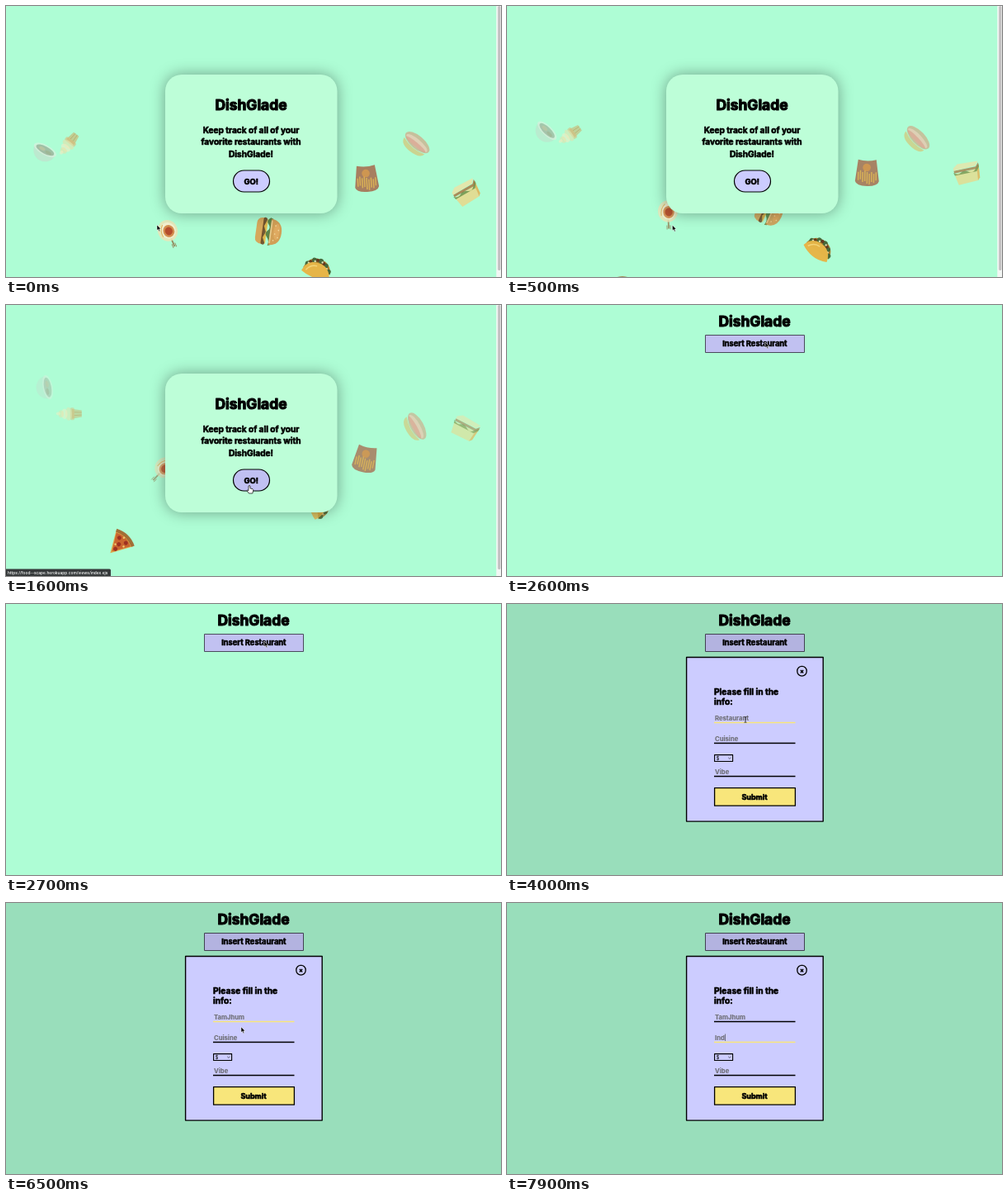
An HTML page with a canvas for the animation above (8000 ms loop, 600x328 px).

```html
<!DOCTYPE html>
<html lang="en">
<head>
<meta charset="utf-8">
<title>DishGlade</title>
<style>
html, body { margin: 0; width: 100%; height: 100%; overflow: hidden; background: #aefdd5; }
canvas { display: block; width: 600px; height: 328px; }
</style>
</head>
<body>
<canvas id="stage" width="600" height="328"></canvas>
<script>
const ctx = document.getElementById('stage').getContext('2d');
const LOOP = 8000, W = 600, H = 328;
const MINT = '#aefdd5', LILAC = '#ccccff', YELLOW = '#f8e67b', INK = '#000';
const BRAND = 'DishGlade', PLACE = 'TamJhum';

// ---------- drawing helpers ----------
function text(s, x, y, size, { align = 'center', color = INK, weight = 700, round = 0.6 } = {}) {
  ctx.font = `${weight} ${size}px Inter, "Open Sans", sans-serif`;
  ctx.textAlign = align;
  ctx.fillStyle = ctx.strokeStyle = color;
  ctx.fillText(s, x, y);
  if (round) {
    ctx.lineJoin = 'round';
    ctx.lineWidth = round;
    ctx.strokeText(s, x, y);
  }
}
function box(x, y, w, h, fill, line = 0, stroke = INK, r = 0) {
  ctx.beginPath();
  ctx.roundRect(x, y, w, h, r);
  if (fill) { ctx.fillStyle = fill; ctx.fill(); }
  if (line) { ctx.strokeStyle = stroke; ctx.lineWidth = line; ctx.stroke(); }
}
function oval(x, y, rx, ry, fill, rot = 0) {
  ctx.beginPath();
  ctx.ellipse(x, y, rx, ry, rot, 0, Math.PI * 2);
  ctx.fillStyle = fill;
  ctx.fill();
}
function shape(d, fill, stroke, line = 1) {
  const p = new Path2D(d);
  if (fill) { ctx.fillStyle = fill; ctx.fill(p); }
  if (stroke) { ctx.strokeStyle = stroke; ctx.lineWidth = line; ctx.stroke(p); }
}
function dots(points, r, fill) {
  for (const [x, y] of points) oval(x, y, r, r, fill);
}

// ---------- food, drawn around its own centre ----------
const art = {
  bowl() {
    shape('M-14-3A13 13 0 0 0 14-3Z', '#c5dccb');
    oval(0, -3, 15, 6, '#e3f0e2');
    oval(0, -3, 12, 4.4, '#7f9a80');
    oval(-4, -3, 4, 2, '#c9c9a0');
    oval(5, -2, 4, 1.8, '#9db08a');
  },
  cone() {
    shape('M-6 3L6 3L4 15L-4 15Z', '#cfa860');
    box(-7.5, 1, 15, 5, '#dcb877', 0, INK, 1.5);
    shape('M-2 6L-1.5 15M2 6L1.5 15', null, '#b58f4c', 0.8);
    oval(0, -1, 8, 4, '#eadfa6');
    oval(0, -6, 6.3, 3.8, '#f5ecc2');
    oval(0, -10, 4.3, 3.2, '#eadfa6');
    oval(0.5, -13.5, 2, 2.6, '#f5ecc2');
  },
  hotdog() {
    shape('M-16 3Q0 9 16 3Q15 11 0 11.5T-16 3Z', '#e2b45a');
    oval(0, -2.5, 18, 8, '#d9916f');
    oval(0, -1.5, 16, 4.6, '#f2dccb');
    oval(0, 0.5, 15, 2.6, '#d69583');
  },
  fries() {
    shape('M-11-16Q0-13 11-16L14.5 10Q13 16 0 16T-14.5 10Z', '#a5492f');
    for (let i = -4; i <= 4; i++) box(i * 2.7 - 0.7, -1 + (i % 2) * 2, 1.5, 14 - Math.abs(i), '#efc651');
    oval(-0.5, -6.5, 4.8, 4.8, '#e0a04a');
  },
  sandwich() {
    shape('M-15-2L13-2L16-6L14 9L11 12L-13 12Z', '#f0d27f');
    shape('M11 12L13-2L16-6L14 9Z', '#d9ad52');
    shape('M-16-4Q-11 1-7-2T2-1T11-2L16-7L16-4L12 1L-15 0Z', '#5c8a45');
    shape('M-15-6L12-5L16-9L16-6L12-2L-15-3Z', '#a8652f');
    shape('M-15-9L-9-13L16-11L12-6L-15-6Z', '#f3dfa0');
  },
  pasta() {
    shape('M4 0L21 0', null, '#927f52', 1.8);
    shape('M17-2L22-2M17 2L22 2', null, '#927f52', 0.9);
    oval(0, 0, 13, 12, '#e9e6b9');
    oval(0, -0.5, 10, 9, '#f3f0d2');
    oval(1, -1, 7.5, 6.8, '#cf8240');
    oval(1, -1, 5, 4.6, '#b2472a');
    shape('M-9 3Q-4 9 5 8', null, '#dcb25c', 1.2);
  },
  burger() {
    shape('M-16 6L16 6Q16 15 9 15L-9 15Q-16 15-16 6Z', '#d99f50');
    box(-16.5, 3, 33, 4.5, '#6b4826', 0, INK, 2);
    shape('M-16 2L16 2L8 6L1 3L-6 6Z', '#e8c04f');
    shape('M-17-1Q-13 5-9 1T-1 1T7 1T17-1L16-4L-16-4Z', '#54783a');
    shape('M-16-2Q-15-16 0-16T16-2Z', '#d4954a');
    oval(-1, -10, 10, 3.6, '#e0ab62');
    shape('M-14-3L14-3', null, '#ead49a', 1.6);
    dots([[-8, -8], [-3, -12], [2, -8], [6, -12], [10, -7]], 0.8, '#f4dfa4');
  },
  taco() {
    shape('M-17 2Q-14-13 0-13T17 2Z', '#a87a2c');
    dots([[-13, -4], [-6, -10], [2, -11], [9, -7], [14, -1]], 3, '#45683a');
    dots([[-10, -7], [-2, -11], [6, -9]], 2, '#63391f');
    dots([[-12, -5], [-5, -9], [4, -10], [11, -4]], 1.2, '#dde0b4');
    shape('M-18 6Q-15-8-1-8T17 6Q8 11-1 10.5T-18 6Z', '#e6b548');
    shape('M-13 4Q-9-4-1-4', null, '#f4d478', 1.6);
  },
  pizza() {
    shape('M-14-8Q0-15 14-8L0 17Z', '#e0a446');
    shape('M-12-6Q0-12 12-6L0 14Z', '#c9622e');
    shape('M-14-8Q0-15 14-8', null, '#a06a32', 4);
    dots([[-5, -4], [5, -5], [0, 2], [1, 9]], 2.5, '#9c2f20');
    dots([[-1, -8], [-3, 5], [6, 0]], 1.3, '#f0cc70');
  }
};

// name, x, y at start, x speed, y speed (px/s), start angle, spin (deg/s)
const foods = [
  ['bowl', 46, 177, 1, -48, 28, 32],
  ['cone', 76, 167, 0.5, -22, 218, 32],
  ['hotdog', 497, 167, -0.6, -12, 40, 13],
  ['fries', 437, 209, -1, -14, -4, 10],
  ['sandwich', 558, 226, -1, -48, -32, 36],
  ['pasta', 196, 272, -2, -47, 66, 42],
  ['burger', 318, 273, 0, -48, 98, 34],
  ['taco', 377, 319, 1, -48, 16, 42],
  ['pizza', 143, 365, -3, -48, -12, 35]
];

function drawFoods(sec) {
  for (const [name, x, y, vx, vy, angle, spin] of foods) {
    const cy = y + vy * sec;
    ctx.save();
    ctx.globalAlpha = Math.min(1, cy / 300);
    ctx.translate(x + vx * sec, cy);
    ctx.rotate((angle + spin * sec) * Math.PI / 180);
    art[name]();
    ctx.restore();
  }
}

// ---------- pointer ----------
const path = [
  [0, 183, 265], [300, 183, 265], [1000, 270, 266], [1450, 295, 219], [1950, 295, 219],
  [2500, 313, 45], [2850, 313, 45], [3400, 289, 140], [6250, 289, 140],
  [6500, 285, 150], [6800, 285, 163], [8000, 285, 163]
];
function pointerAt(t) {
  const i = path.findIndex(k => k[0] > t);
  const [t0, x0, y0] = path[i - 1], [t1, x1, y1] = path[i];
  const k = (t - t0) / (t1 - t0), e = k * k * (3 - 2 * k);
  return [x0 + (x1 - x0) * e, y0 + (y1 - y0) * e];
}
const inside = ([x, y], l, t, r, b) => x > l && x < r && y > t && y < b;

function drawPointer([x, y], kind) {
  ctx.save();
  ctx.translate(x, y);
  ctx.lineJoin = 'round';
  if (kind === 'arrow') {
    shape('M0 0L0 6.6L1.5 5.3L2.7 7.8L3.8 7.2L2.7 4.9L4.7 4.7Z', INK, '#fff', 0.5);
  } else if (kind === 'hand') {
    shape('M-1 0Q0-1 1 0L1 3L4 3.6Q5 4 4.6 6L3.8 9L-.6 9L-3 5.6Q-2.6 4.4-1 5.6Z', '#fff', INK, 0.7);
  } else {
    shape('M-1.4-3.5Q0-3.5 0-2.5Q0-3.5 1.4-3.5M0-2.5L0 2.5M-1.4 3.5Q0 3.5 0 2.5Q0 3.5 1.4 3.5', null, '#222', 0.8);
  }
  ctx.restore();
}

// ---------- screens ----------
function landing(t, mouse) {
  const hover = inside(mouse, 275, 199, 320, 225);
  drawFoods(t / 1000);

  ctx.save();
  ctx.shadowColor = 'rgba(0,0,0,.36)';
  ctx.shadowBlur = 18;
  box(193, 83, 208.5, 168, '#bdfed8', 0, INK, 20);
  ctx.restore();

  text(BRAND, 297, 126, 17.4, { round: 1.1 });
  text('Keep track of all of your', 297, 153.7, 10.1);
  text('favorite restaurants with', 297, 168.2, 10.1);
  text(BRAND + '!', 297, 182.8, 10.1);
  box(275.5, 199, 44, 26, hover ? '#c0c0f2' : LILAC, 1.2, INK, 13);
  text('GO!', 297.3, 215.5, 9.4);

  box(594.3, 0, 5.7, H, '#f3f6f4');
  box(596.2, 0, 3.2, 320, '#c2c0c1', 0, INK, 1.6);

  if (hover) {
    box(0, 319.5, 127, 8.5, '#35393a', 0, INK, [0, 1.5, 0, 0]);
    text('https://food--scape.herokuapp.com/views/index.ejs', 2, 325.7, 4.85,
      { align: 'left', color: '#fff', weight: 500, round: 0 });
  }
  drawPointer(mouse, hover ? 'hand' : 'arrow');
}

function listPage(hover) {
  text(BRAND, 300, 26, 17.4, { round: 1.1 });
  box(240.5, 36.5, 120, 21, hover ? '#c1c1f1' : LILAC, 1, '#4a4a5c');
  text('Insert Restaurant', 300.3, 50.4, 9.3);
}

function field(hint, value, base, focused, sinceKey) {
  const left = { align: 'left', color: '#707078', weight: 700, round: 0.15 };
  text(value || hint, 252, base, 7.7, left);
  ctx.fillStyle = focused ? YELLOW : INK;
  ctx.fillRect(251, base + 2.2, 98.5, 1.5);
  if (focused && Math.floor(sinceKey / 500) % 2 === 0) {
    const x = 252.3 + (value ? ctx.measureText(value).width : 0);
    ctx.fillStyle = '#333';
    ctx.fillRect(x, base - 7, 0.6, 8.5);
  }
}

// returns the typed part of a word and the time since the last key or focus
function typed(word, keys, start, t) {
  const n = keys.filter(k => k <= t).length;
  return [word.slice(0, n), t - (n ? keys[n - 1] : start)];
}
const FOCUS1 = 3450, FOCUS2 = 6900;
const keys1 = [...PLACE].map((_, i) => 4700 + i * 200);
const keys2 = [7450, 7650, 7800];

function modal(t) {
  ctx.fillStyle = 'rgba(0,0,0,.12)';
  ctx.fillRect(0, 0, W, H);
  box(217.6, 64.5, 165.6, 198.6, LILAC, 1.4);

  box(351.8, 75.3, 11.4, 11.8, null, 1.3, INK, 5.6);
  shape('M355.9 80L359.1 83.4M359.1 80L355.9 83.4', null, INK, 1.5);

  text('Please fill in the', 251, 110, 10.2, { align: 'left' });
  text('info:', 251, 122, 10.2, { align: 'left' });

  const [name, since1] = typed(PLACE, keys1, FOCUS1, t);
  const [cuisine, since2] = typed('Ind', keys2, FOCUS2, t);
  field('Restaurant', name, 140.6, t >= FOCUS1 && t < FOCUS2, since1);
  field('Cuisine', cuisine, 165.5, t >= FOCUS2, since2);
  field('Vibe', '', 205.6, false, 0);

  box(251.6, 182.6, 22, 7.9, LILAC, 1.1);
  text('$', 253.8, 188.8, 5.6, { align: 'left', weight: 500, round: 0 });
  shape('M268.2 185.8L269.8 187.4L271.4 185.8', null, '#333', 0.7);

  box(251.6, 222.6, 97.8, 21.6, YELLOW, 1.3);
  text('Submit', 300, 236.7, 9);
}

function render(t) {
  const mouse = pointerAt(t);
  ctx.fillStyle = MINT;
  ctx.fillRect(0, 0, W, H);
  if (t < 1900) return landing(t, mouse);

  const open = t >= 2800;
  listPage(!open && inside(mouse, 240, 36, 361, 58));
  if (open) modal(t);

  const typing = (t >= keys1[0] && t < 6250) || t >= keys2[0];
  const overField = inside(mouse, 251, 133, 350, 145) || inside(mouse, 251, 157, 350, 169);
  if (!typing) drawPointer(mouse, open && overField ? 'beam' : 'arrow');
}

function tick() {
  render(performance.now() % LOOP);
  requestAnimationFrame(tick);
}
tick();
</script>
</body>
</html>
```
